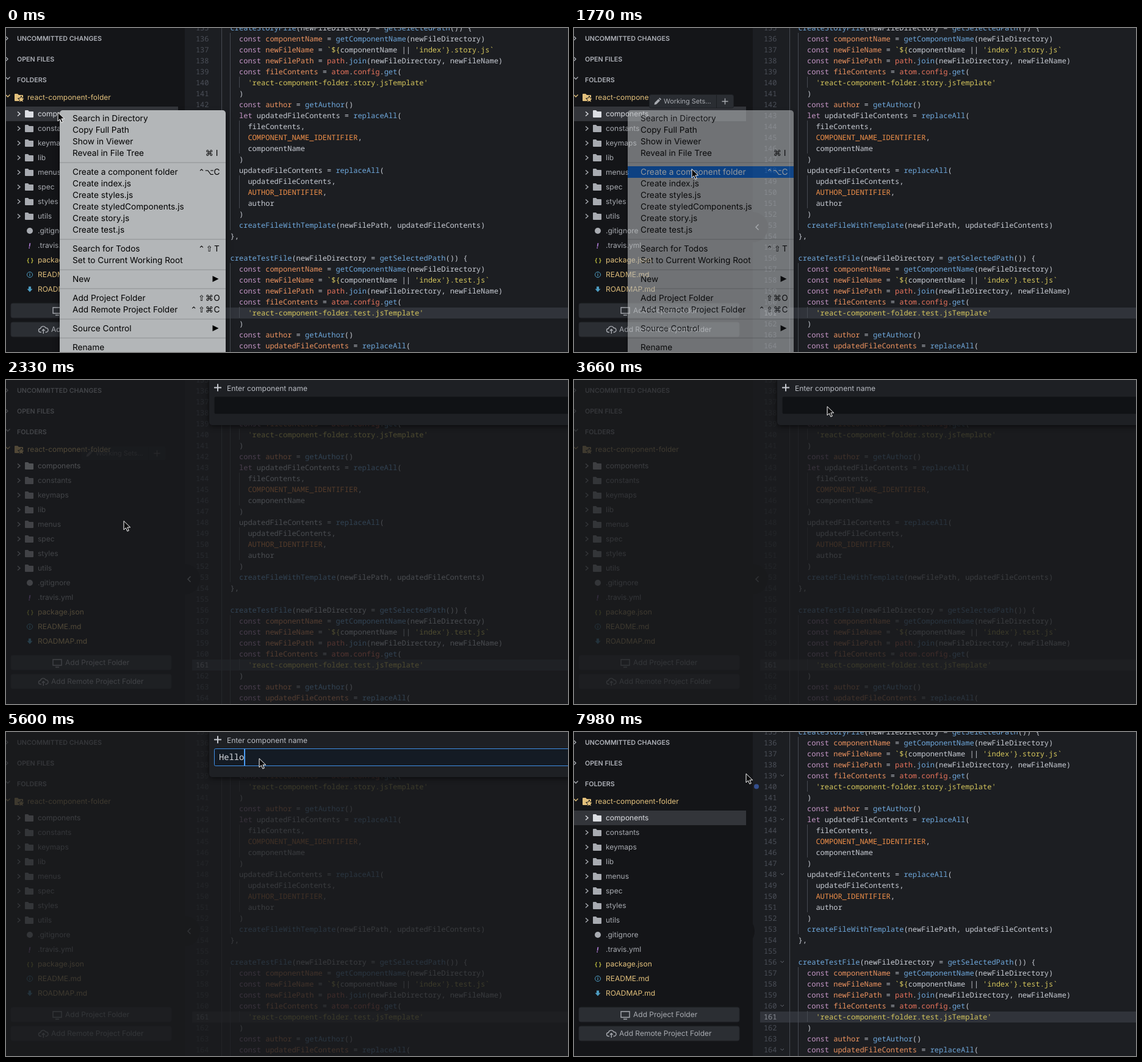
Write an HTML page that moves like this. It is 921 by 532 pixels and loops after 8 s.

```html
<!DOCTYPE html>
<html lang="en">
<head>
<meta charset="utf-8">
<title>Creating a component folder</title>
<style>
  html, body { margin: 0; width: 100%; height: 100%; overflow: hidden; background: #1c1e22; }
  svg { display: block; }
  text { font: 12px Inter, sans-serif; white-space: pre; text-rendering: geometricPrecision; }
  .code text { font: 12px "Noto Sans Mono", monospace; fill: #c8ccd4; }
  .code .num { fill: #4b4f58; text-anchor: end; }
  .key { fill: #c596c6; } .var { fill: #ee9460; } .fn { fill: #6fa8dc; }
  .str { fill: #d5c65c; } .id { fill: #f2914a; } .obj { fill: #e8735c; }
  .head { font-size: 10.7px; font-weight: 600; fill: #b0b3ba; }
  .line { fill: none; stroke-width: 1.4; }
  #menu { filter: drop-shadow(0 6px 6px rgba(0, 0, 0, .45)); }
  #menu text { font-size: 13.65px; }
  #menu .sym { font: 13px "DejaVu Sans", sans-serif; text-anchor: middle; }
  .row rect { fill: none; }
  .row.hot { fill: #f4f6f8; }
  .row.hot rect { fill: #0862cf; }
  #dialog { filter: drop-shadow(0 2px 5px rgba(0, 0, 0, .6)); }
  #typed { font: 13.75px "Noto Sans Mono", monospace; fill: #d7dae0; }
</style>
</head>
<body>
<svg id="stage" width="921" height="532" viewBox="0 0 921 532"></svg>
<script>
const LOOP = 8000, STEP = 145;
const FIRST_LINE = 135, CHAR = 7.2, CODE_X = 353.2;
const TYPED_CHAR = 8.25, TYPED_X = 349;
const GOLD = '#e2c07c', GREY = '#a8abb1';

const rect = (x, y, w, h, fill, extra = '') =>
  `<rect x="${x}" y="${y}" width="${w}" height="${h}" fill="${fill}" ${extra}/>`;
const text = (x, y, str, extra = '') => `<text x="${x}" y="${y}" ${extra}>${str}</text>`;
const path = (d, fill) => `<path d="${d}" fill="${fill}"/>`;
const line = (d, stroke, extra = '') => `<path class="line" d="${d}" stroke="${stroke}" ${extra}/>`;
const lineY = n => 17 + (n - 136) * 18;

// Editor
const opening = (kind, keyword) => `
  create${kind}File(newFileDirectory = getSelectedPath()) {
    const componentName = getComponentName(newFileDirectory)
    const newFileName = \`\${componentName || 'index'}.${kind.toLowerCase()}.js\`
    const newFilePath = path.join(newFileDirectory, newFileName)
    const fileContents = atom.config.get(
      'react-component-folder.${kind.toLowerCase()}.jsTemplate'
    )
    const author = getAuthor()
    ${keyword} updatedFileContents = replaceAll(`.slice(1);

const source = `${opening('Story', 'let')}
      fileContents,
      COMPONENT_NAME_IDENTIFIER,
      componentName
    )
    updatedFileContents = replaceAll(
      updatedFileContents,
      AUTHOR_IDENTIFIER,
      author
    )
    createFileWithTemplate(newFilePath, updatedFileContents)
  },

${opening('Test', 'const')}`;

function tokenClass(word, at, row) {
  if (/['`]/.test(word)) return 'str';
  if (/^(const|let)$/.test(word)) return 'key';
  if (row.slice(0, at).endsWith('const ')) return 'var';
  if (row[at + word.length] === '(') return 'fn';
  if (/^[A-Z_]+$/.test(word)) return 'id';
  if (/^(path|atom|config)$/.test(word)) return 'obj';
}

function highlight(row) {
  return row.replace(/'[^']*'|`\$\{|\}\.\w+\.js`|\w+/g, (word, at) => {
    const name = tokenClass(word, at, row);
    return name ? `<tspan class="${name}">${word}</tspan>` : word;
  });
}

function editor() {
  const guide = (col, from, to) =>
    rect(Math.floor(CODE_X + col * CHAR), lineY(from) - 9, 1, (to - from + 1) * 18, '#464a51');
  const rows = source.split('\n').map((row, i) => {
    const n = FIRST_LINE + i, indent = row.search(/\S|$/);
    return text(332.5, lineY(n) + 4.5, n, n === 161 ? 'class="num" style="fill:#8a8e96"' : 'class="num"') +
      text(CODE_X + indent * CHAR, lineY(n) + 4.5, highlight(row.trim()));
  });
  const folds = [135, 139, 143, 148, 156, 160, 164]
    .map(n => line(`M338.5 ${lineY(n) - 1}l2.7 2.7l2.7-2.7`, '#6a6e76', 'style="stroke-width:1"'));
  return `<g class="code">${rect(293, 0, 628, 532, '#1c1e22')}${rect(305, 459, 616, 18, '#30333a')}
    ${guide(0, 135, 165)}${guide(2, 136, 153)}${guide(2, 157, 165)}
    ${guide(4, 140, 140)}${guide(4, 144, 146)}${guide(4, 149, 151)}${guide(4, 161, 161)}
    ${rows.join('')}
    <g id="folds">${folds.join('')}<circle cx="299" cy="89.5" r="4" fill="#344f8e"/></g></g>
    <g id="toggle"><circle cx="293" cy="327" r="25" fill="#141518"/>
    ${line('M302.5 322.5l-4.5 4.5l4.5 4.5', '#9a9da4')}</g>`;
}

// Sidebar
const folder = (x, y, fill) => path(`M${x} ${y - 5}q0-1 1-1h4l2 2h6q1 0 1 1v8q0 1-1 1h-12q-1 0-1-1z`, fill);

function sidebar() {
  const heads = ['UNCOMMITTED CHANGES', 'OPEN FILES', 'FOLDERS'].map((label, i) =>
    text(18, 21 + i * 34, label, 'class="head"') +
    line(i < 2 ? `M0 ${14 + i * 34}l3 3l-3 3` : 'M0 81l3 3l3.5-3.5', GREY));
  const dirs = ['components', 'constants', 'keymaps', 'lib', 'menus', 'spec', 'styles', 'utils'].map((name, i) => {
    const y = 141 + i * 24, tint = i ? GREY : '#dcdee3';
    return line(`M19 ${y - 3.5}l4 3.5l-4 3.5`, tint) + folder(31, y, tint) + text(52, y + 4.3, name, `fill="${tint}"`);
  });
  const files = ['.gitignore', '.travis.yml', 'package.json', 'README.md', 'ROADMAP.md'].map((name, i) =>
    text(52, 337.3 + i * 24, name, `fill="${i < 2 ? GREY : GOLD}"`));
  const button = y => rect(8, y, 263, 24, '#2b2e33', 'rx="3" stroke="#222429"');
  return `${rect(0, 0, 293, 532, '#141518')}${heads.join('')}
    ${line('M0 110l3 3l3.5-3.5', GOLD)}${folder(14, 114, GOLD)}
    <path d="M25 111.500l1.700 3.500l3.800.6l-2.800 2.700l.7 3.800l-3.400-1.800l-3.400 1.800l.7-3.800l-2.800-2.700l3.800-.6z" fill="${GOLD}" stroke="#141518"/>
    ${text(35, 118.3, 'react-component-folder', `fill="${GOLD}"`)}
    ${rect(0, 129, 282, 24, '#33353a', 'id="selected"')}${dirs.join('')}${files.join('')}
    <circle cx="39" cy="333" r="5" fill="${GREY}"/>
    ${text(36.5, 361.5, '!', 'fill="#a978cf" style="font-style:italic;font-weight:700"')}
    ${text(34, 384.5, '{ }', 'fill="#cbcb41" style="font-size:9.500px;font-weight:600"')}
    <circle class="line" cx="39" cy="405" r="4.500" stroke="#4d9bc0" style="stroke-width:1"/>
    ${rect(38.4, 404, 1.2, 3.5, '#4d9bc0')}${rect(38.4, 402, 1.2, 1.2, '#4d9bc0')}
    ${path('M37 424.500h4v4h2.500l-4.500 5l-4.500-5h2.500z', '#4d9bc0')}
    ${button(452)}${button(483)}
    ${text(97, 468.3, 'Add Project Folder', `fill="${GREY}"`)}
    ${text(74, 499.3, 'Add Remote Project Folder', `fill="${GREY}"`)}
    ${line('M77 459h14v9.500h-14zM81 471.500h6', GREY)}
    ${line('M58 499.500h-1.500a3 3 0 0 1 0-6a4.500 4.500 0 0 1 8.500-1a3.500 3.500 0 0 1 1 7h-1.500M61.300 502v-7M59 497l2.300-2.300l2.300 2.300', GREY)}
    <g id="sets">${rect(123.5, 109.5, 138, 22, '#2a2d32', 'rx="3" stroke="#202226"')}${rect(233, 110, 1, 21, '#1c1e22')}
      ${path('M131.500 126l.8-3.500l6-6l2.700 2.700l-6 6zM139 115.800l1.500-1.300l2.500 2.500l-1.300 1.500z', GREY)}
      ${text(147, 124, 'Working Sets...', `fill="${GREY}" style="font-size:10.900px"`)}
      ${line('M242.500 120.500h10M247.500 115.500v10', GREY)}</g>`;
}

// Context menu
const items = [
  [148, 'Search in Directory'], [167, 'Copy Full Path'], [186, 'Show in Viewer'], [205, 'Reveal in File Tree', '⌘I'],
  [236, 'Create a component folder', '⌃⌥C'], [255, 'Create index.js'], [274, 'Create styles.js'],
  [293, 'Create styledComponents.js'], [312, 'Create story.js'], [331, 'Create test.js'],
  [362, 'Search for Todos', '⌃⇧T'], [381, 'Set to Current Working Root'], [412, 'New', '▶'],
  [443, 'Add Project Folder', '⇧⌘O'], [462, 'Add Remote Project Folder', '⌃⇧⌘C'],
  [493, 'Source Control', '▶'], [524, 'Rename']
];

function shortcut(keys, y) {
  if (keys === '▶') return `<path d="M338.500 ${y - 5}l10 5l-10 5z"/>`;
  return [...keys].reverse().map((key, i) => i
    ? text(346 - i * 12.8, y + 5, key, 'class="sym"')
    : text(345.5, y + 5, key, 'text-anchor="middle"')).join('');
}

function menu() {
  const rows = items.map(([y, label, keys = '']) =>
    `<g class="row">${rect(88, y - 9, 272, 19, 'none')}${text(109, y + 5, label)}${shortcut(keys, y)}</g>`);
  const rules = [220, 346, 396, 427, 477, 508].map(y => rect(88, y, 272, 2, '#a0a3a5'));
  return `<g id="menu">${rect(88, 135, 272, 420, '#b3b6b8', 'rx="5"')}${rules.join('')}${rows.join('')}</g>`;
}

// Name prompt
const dialog = () => `<g id="dialog">${rect(333, -10, 620, 84, '#1e2024', 'rx="5"')}
  ${line('M341 12.500h12M347 6.500v12', '#c6c9cf', 'style="stroke-width:2"')}
  ${text(362, 18.2, 'Enter component name', 'fill="#b9bcc3"')}
  ${rect(341.5, 27.5, 600, 28, '#101215', 'id="field" rx="2"')}
  ${text(TYPED_X, 46, '', 'id="typed"')}${rect(0, 28, 2, 27, '#4a9cf3', 'id="caret"')}</g>`;

const stage = document.getElementById('stage');
stage.innerHTML = editor() + sidebar() + rect(0, 0, 921, 532, '#1a1b1e', 'id="shade"') + menu() + dialog() +
  `<path id="pointer" d="M0 .5v14.500l3.400-3.200l2.400 5.500l2.500-1.100l-2.400-5.300h4.800z" fill="#0b0b0c" stroke="#fff" stroke-linejoin="round"/>`;

const el = Object.fromEntries([...stage.querySelectorAll('[id]')].map(node => [node.id, node]));
const menuRows = [...stage.querySelectorAll('.row')];

// [time, value...] lists; the latest entry that has begun applies
const at = (list, t) => list.findLast(entry => entry[0] <= t);
const menuAlpha = [[0, 1], [1770, .58], [1890, 0]];
const setsAlpha = [[0, 0], [150, .5], [290, 1], [2330, .35], [2470, 0]];
const shadeAlpha = [[0, 0], [2330, .72], [2470, .82], [7380, 0]];
const typing = [
  [0, '', 0], [3810, '', 1], [4110, '', 0], [4410, 'H', 1], [4560, 'He', 1], [4710, 'Hell', 1], [4860, 'Hello', 1],
  [5160, 'Hellow', 1], [5450, 'Hellow', 0], [5600, 'Hello', 1], [5900, 'Hello', 0], [6350, 'HelloW', 1],
  [6500, 'HelloWor', 1], [6640, 'HelloWorl', 1], [6780, 'HelloWorld', 1], [7080, 'HelloWorld', 0]
];
// [start, steps, x, y]
const moves = [[590, 4, 193, 231], [2920, 6, 415, 43], [7830, 1, 310, 84], [7975, 1, 282, 68]];

function pointerAt(t) {
  let x = 85, y = 138;
  for (const [start, steps, toX, toY] of moves) {
    if (t < start) break;
    const p = Math.min(1, (Math.floor((t - start) / STEP) + 1) / steps);
    const eased = p * p * (3 - 2 * p);
    x += (toX - x) * eased;
    y += (toY - y) * eased;
  }
  return [x, y];
}

const show = (node, alpha) => node.setAttribute('opacity', +alpha);

function draw(t) {
  const [x, y] = pointerAt(t);
  el.pointer.setAttribute('transform', `translate(${x} ${y})`);
  menuRows.forEach((row, i) => row.classList.toggle('hot', x > 88 && Math.abs(y - items[i][0]) < 9.5));

  const shade = at(shadeAlpha, t)[1];
  show(el.menu, at(menuAlpha, t)[1]);
  show(el.sets, at(setsAlpha, t)[1]);
  show(el.shade, shade);
  show(el.dialog, shade > 0);
  show(el.selected, shade === 0);
  show(el.folds, t >= 7830);
  show(el.toggle, t < 7380 || t >= 7975);
  el.toggle.setAttribute('transform', `translate(${t < 7380 ? 0 : -22} 0)`);

  const [, word, caret] = at(typing, t);
  const focused = t >= 3810;
  el.field.setAttribute('fill', focused ? '#141b24' : '#101215');
  el.field.setAttribute('stroke', focused ? '#3f8fe6' : 'none');
  el.typed.textContent = word;
  el.caret.setAttribute('x', Math.round(TYPED_X + word.length * TYPED_CHAR));
  show(el.caret, caret);
}

function tick() {
  draw(performance.now() % LOOP);
  requestAnimationFrame(tick);
}
tick();
</script>
</body>
</html>
```
